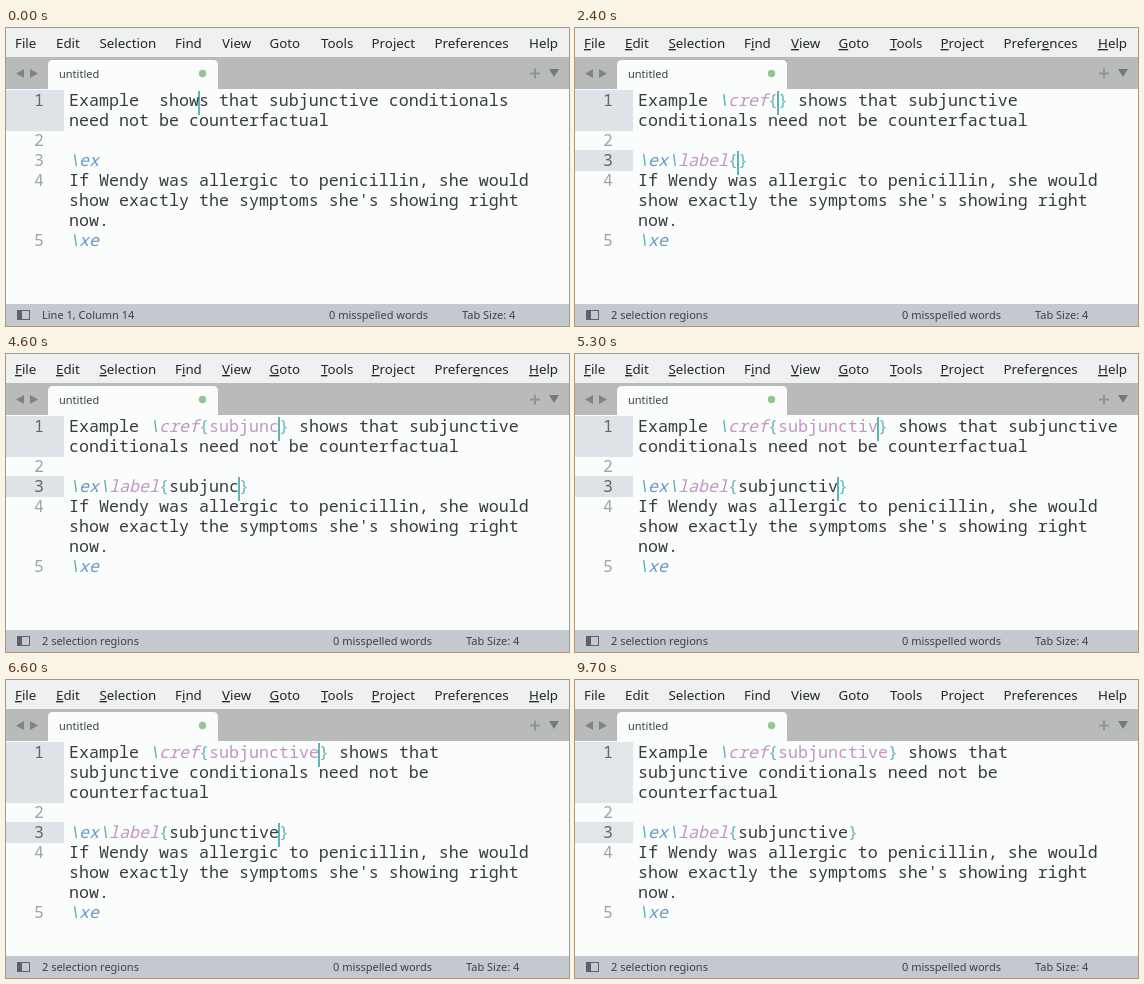
Animation of 563x298 px, one loop 9.8 s. Source, as an HTML page:

```html
<!DOCTYPE html>
<html lang="en">
<head>
<meta charset="utf-8">
<title>Editor</title>
<style>
html, body { margin: 0; width: 100%; height: 100%; overflow: hidden; background: #fbfdfd; }
svg { display: block; width: 563px; height: 298px; }
text { white-space: pre; }
.ui { font: 11px "Noto Sans", sans-serif; fill: #3b4046; }
.menu { font: 13.33px "Noto Sans", sans-serif; fill: #232629; }
.code { font: 16.667px "Noto Sans Mono", monospace; fill: #383b40; }
.num { fill: #a0a4a8; }
.num.on { fill: #626569; }
.teal { fill: #5fb4b4; }
.slash { fill: #5fb4b4; font-style: italic; }
.blue { fill: #6699cc; font-style: italic; }
.macro { fill: #c594c5; font-style: italic; }
.arg { fill: #c594c5; }
.alt .key { text-decoration: underline; }
</style>
</head>
<body>
<svg viewBox="0 0 563 298">
  <rect width="563" height="298" fill="#fbfdfd"/>
  <g id="doc"></g>
  <rect width="563" height="30" fill="#eff0f0"/>
  <g id="menu" class="menu"></g>
  <rect y="29" width="563" height="32" fill="#b9bbbb"/>
  <path d="M42 61V37q0-5 5-5H207q5 0 5 5V61z" fill="#fbfdfd"/>
  <path d="M18 41v9l-8-4.500zM24 41v9l8-4.500z" fill="#808486"/>
  <text class="ui" x="53" y="50">untitled</text>
  <circle cx="196.500" cy="45.500" r="3.700" fill="#95c495"/>
  <path d="M524 45.500h10M529 40.500v10" stroke="#929597" stroke-width="2"/>
  <path d="M543 41h10l-5 8z" fill="#75797c"/>
  <rect y="276" width="563" height="22" fill="#c4c9cf"/>
  <rect x="11.500" y="282.500" width="12" height="9" fill="none" stroke="#5c6269"/>
  <rect x="12" y="283" width="4" height="9" fill="#5c6269"/>
  <text class="ui" id="place" x="36" y="291"></text>
  <text class="ui" id="words" y="291">0 misspelled words</text>
  <text class="ui" id="tab" y="291">Tab Size: 4</text>
</svg>
<script>
const LOOP = 9800, COLS = 48, CELL = 10, ROW = 20, LEFT = 63, TOP = 62;
const WORD = "subjunctive";
const LEFT_KEYS = [200, 500, 800, 1000, 1300];
const TYPE_KEYS = [3400, 3500, 3800, 4000, 4200, 4400, 4600, 4800, 5000, 5200, 5400];
const ALT_ON = 2200, SNIPPET = 2300, IDLE = 8700;

// label, x, index of the mnemonic letter
const MENU = [["File", 9, 0], ["Edit", 50, 0], ["Selection", 93.5, 0], ["Find", 169, 1],
  ["View", 216, 0], ["Goto", 263.5, 0], ["Tools", 315, 0], ["Project", 365.5, 0],
  ["Preferences", 428.5, 6], ["Help", 523, 0]];

const get = id => document.getElementById(id);
const past = (keys, t) => keys.filter(k => t >= k).length;

get("menu").innerHTML = MENU.map(([s, x, k]) =>
  `<text x="${x}" y="20">${s.slice(0, k)}<tspan class="key">${s[k]}</tspan>${s.slice(k + 1)}</text>`).join("");

// Cells carry a character and its style; "|" in the style list marks a caret.
function cells(tokens) {
  const out = [];
  for (const [text, style = ""] of tokens)
    for (const ch of text) out.push({ ch, style });
  return out;
}

function wrap(line) {
  const rows = [];
  let start = 0;
  while (line.length - start > COLS) {
    let end = start + COLS;
    while (line[end].ch !== " ") end--;
    rows.push(line.slice(start, end));
    start = end + 1;
  }
  rows.push(line.slice(start));
  return rows;
}

function drawRow(row, y) {
  let out = "", i = 0;
  while (i < row.length) {
    const { style } = row[i], from = i;
    let s = "";
    while (i < row.length && row[i].style === style) s += row[i++].ch;
    out += `<tspan x="${LEFT + from * CELL}" class="${style}">${s}</tspan>`;
  }
  return `<text class="code" y="${y + 16}">${out}</text>`;
}

function lines(label) {
  const tail = " shows that subjunctive conditionals need not be counterfactual";
  const ex = [["\\", "slash"], ["ex", "blue"]];
  const on = label !== null;
  return [
    on ? [["Example "], ["\\", "slash"], ["cref", "macro"], ["{", "teal"], [label, "arg"], ["}", "teal"], [tail]]
       : [["Example " + tail]],
    [],
    on ? [...ex, ["\\", "slash"], ["label", "macro"], ["{", "teal"], [label], ["}", "teal"]] : ex,
    [["If Wendy was allergic to penicillin, she would show exactly the symptoms she's showing right now."]],
    [["\\", "slash"], ["xe", "blue"]]
  ];
}

function drawDoc(label, carets, idle) {
  let y = TOP, back = "", front = "";
  lines(label).forEach((tokens, n) => {
    const rows = wrap(cells(tokens)), on = n in carets;
    if (on) {
      back += `<rect y="${y}" width="58" height="${rows.length * ROW + 1}" fill="${idle ? "#e3e6e9" : "#dfe3e7"}"/>`;
      if (!idle)
        front += `<rect x="${LEFT + carets[n] * CELL - 1}" y="${y + 1}" width="2" height="24" fill="#5fb4b4"/>`;
    }
    front += `<text class="code num${on ? " on" : ""}" x="28" y="${y + 16}">${n + 1}</text>`;
    for (const row of rows) {
      front += drawRow(row, y);
      y += ROW;
    }
  });
  get("doc").innerHTML = back + front;
}

let last = "";
function render(t) {
  const two = t >= SNIPPET, idle = t >= IDLE;
  const alt = t >= ALT_ON && !idle;
  const col = 14 - past(LEFT_KEYS, t);
  const typed = past(TYPE_KEYS, t);
  const state = [two, idle, alt, col, typed].join();
  if (state === last) return;
  last = state;

  const label = two ? WORD.slice(0, typed) : null;
  drawDoc(label, two ? { 0: 14 + typed, 2: 10 + typed } : { 0: col - 1 }, idle);
  get("menu").classList.toggle("alt", alt);

  const shift = two ? 4 : col > 9 ? 0 : -6;
  get("place").textContent = two ? "2 selection regions" : `Line 1, Column ${col}`;
  get("words").setAttribute("x", 323 + shift);
  get("tab").setAttribute("x", 456 + shift);
}

const begin = performance.now();
function tick() {
  render((performance.now() - begin) % LOOP);
  requestAnimationFrame(tick);
}
render(0);
tick();
</script>
</body>
</html>
```
